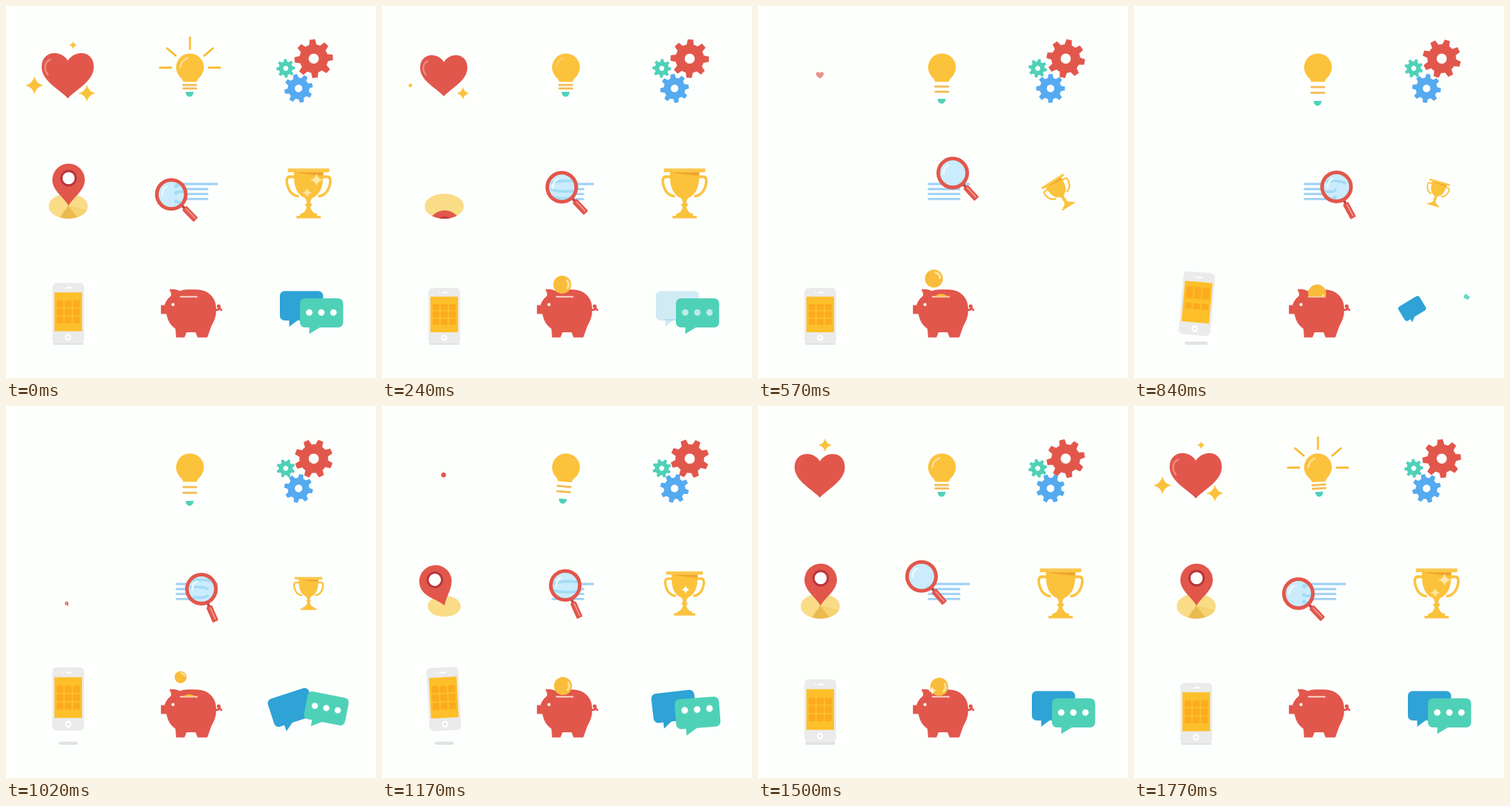
An HTML page with a canvas for the animation above (1800 ms loop, 535 by 537 pixels).

```html
<!DOCTYPE html>
<html lang="en">
<head>
<meta charset="utf-8">
<title>Nine animated icons</title>
<style>
  html, body { margin: 0; width: 100%; height: 100%; overflow: hidden; background: #fdfffd; }
  canvas { display: block; width: 535px; height: 537px; }
</style>
</head>
<body>
<canvas></canvas>
<script>
const W = 535, H = 537, LOOP = 1800, STEP = 30;
const PAPER = '#fdfffd', WHITE = '#fff', RED = '#e2574c', YELLOW = '#fbc23c';
const TEAL = '#4fd1b8', BLUE = '#56aaf0', SKY = '#2fa2d6', CREAM = '#fff3cf';
const canvas = document.querySelector('canvas');
const dpr = window.devicePixelRatio || 1;
canvas.width = W * dpr;
canvas.height = H * dpr;
const ctx = canvas.getContext('2d');
let t = 0;

// Timing helpers: all read the current time t and take start and end times.
const part = (a, b) => Math.min(1, Math.max(0, (t - a) / (b - a)));
const ease = (a, b) => { const u = part(a, b); return u * u * (3 - 2 * u); };
const arch = (a, b) => Math.sin(Math.PI * part(a, b));
// Visible across the loop's seam: grows during a..b, shrinks during c..d.
const span = (a, b, c, d) => 1 - ease(c, d) + ease(a, b);
// Damped swing from 1 to 0 with n half turns; 0 outside its time.
const settle = (a, b, n) => {
  const u = (t - a) / (b - a);
  return u < 0 || u > 1 ? 0 : (1 - u) ** 3 * Math.cos(n * Math.PI * u);
};

// Closed Catmull-Rom curve through evenly timed points.
function orbit(points) {
  const n = points.length, pos = t / LOOP * n, i = Math.floor(pos), u = pos - i;
  const [p, q, r, s] = [-1, 0, 1, 2].map(k => points[(i + k + n) % n]);
  return q.map((v, c) => v + .5 * u * (r[c] - p[c]
    + u * (2 * p[c] - 5 * v + 4 * r[c] - s[c] + u * (3 * (v - r[c]) + s[c] - p[c]))));
}

function fill(path, color) {
  ctx.fillStyle = color;
  ctx.fill(new Path2D(path));
}

function line(path, color, width, cap = 'round') {
  ctx.strokeStyle = color;
  ctx.lineWidth = width;
  ctx.lineCap = cap;
  ctx.stroke(new Path2D(path));
}

function oval(x, y, rx, color, ry = rx) {
  ctx.beginPath();
  ctx.ellipse(x, y, rx, ry, 0, 0, 7);
  ctx.fillStyle = color;
  ctx.fill();
}

function arc(x, y, r, from, to, color, width) {
  ctx.beginPath();
  ctx.arc(x, y, r, from * Math.PI / 180, to * Math.PI / 180);
  ctx.strokeStyle = color;
  ctx.lineWidth = width;
  ctx.lineCap = 'round';
  ctx.stroke();
}

function box(x, y, w, h, r, color) {
  ctx.beginPath();
  ctx.roundRect(x, y, w, h, r);
  ctx.fillStyle = color;
  ctx.fill();
}

// Draw in stage coordinates, transformed around a pivot.
function about(px, py, { dx = 0, dy = 0, rot = 0, s = 1, sx = s, sy = s, alpha = 1 }, draw) {
  if (!sx || !sy || alpha <= 0) return;
  ctx.save();
  ctx.globalAlpha *= alpha;
  ctx.translate(px + dx, py + dy);
  ctx.rotate(rot * Math.PI / 180);
  ctx.scale(sx, sy);
  ctx.translate(-px, -py);
  draw();
  ctx.restore();
}

function clipped(path, draw) {
  ctx.save();
  ctx.clip(new Path2D(path));
  draw();
  ctx.restore();
}

function sparkle(x, y, r, color, alpha = 1) {
  about(0, 0, { dx: x, dy: y, s: r, alpha }, () =>
    fill('M0-1Q.18-.18 1 0Q.18.18 0 1Q-.18.18-1 0Q-.18-.18 0-1Z', color));
}

function heart() {
  oval(89, 99.5, 10 * (ease(1110, 1260) - ease(1260, 1380)), RED);
  const grown = t < 1200 ? 1 - ease(130, 710) : 1 - settle(1200, 1650, 3);
  about(89.5, 100, { s: grown, alpha: 1 - .35 * arch(240, 900) }, () => {
    fill('M89.5 133.5C80 122 51.5 109 51.5 88C51.5 75 60 68 70 68C79 68 86 73 89.5 79C93 73 100 68 109 68C119 68 127 75 127 88C127 109 99 122 89.5 133.5Z', RED);
    about(0, 0, { alpha: .32 * span(1440, 1680, 300, 500) }, () =>
      line('M60.5 99C54 91 56 80 64 77.5', WHITE, 2.6));
  });
  sparkle(97, 56.5, 5.8 * span(1380, 1500, 0, 210) + 4 * arch(1380, 1650), YELLOW);
  sparkle(41, 114.5, 13 * span(1540, 1700, 90, 330), YELLOW);
  sparkle(117, 126, 12.2 * span(1560, 1740, 150, 420), YELLOW);
}

function bulb() {
  const rot = 5 * (arch(1100, 1260) - arch(1680, 1800));
  const gap = ease(240, 720) * (1 - ease(1080, 1380));
  about(266, 89, { rot }, () => {
    fill('M256 109.5C256 104 246 101 246 88.5A20 20 0 0 1 286 88.5C286 101 276 104 276 109.5Z', YELLOW);
    about(0, 0, { alpha: .5 * span(1080, 1440, 0, 450) }, () => {
      const turn = t > 900 ? 80 * (1 - ease(1110, 1400)) : 0;
      arc(266, 89, 14, 185 + turn, 255 + turn, WHITE, 2.4);
    });
    line(`M256.5 ${113.9 + 3 * gap}h18.5`, '#f4bc55', 3);
    line(`M256.5 ${119 + 6.3 * gap}h18.5`, '#f4bc55', 3);
    fill(`M259.8 ${124 + 13 * gap}h11.4q-.5 7-5.7 7t-5.7-7z`, TEAL);
  });

  const inner = t < 900 ? 27 + 16.5 * ease(90, 210) : 27;
  const outer = t < 900 ? 43.5 : 27 + 16.5 * ease(1620, 1710);
  if (outer - inner < .3) return;
  for (let i = 0; i < 5; i++) {
    about(266, 89, { rot: 180 + i * 45 - 5 * Math.sin(i * Math.PI / 2) }, () =>
      line(`M${266 + inner} 89H${266 + outer}`, '#fbb92b', 2.8));
  }
}

function gear(x, y, r, phase, color) {
  about(0, 0, { dx: x, dy: y, rot: phase + 45 * t / LOOP, s: r }, () => {
    oval(0, 0, .75, color);
    for (let i = 0; i < 8; i++) {
      about(0, 0, { rot: i * 45 }, () => fill('M-.2-.65L-.14-1H.14L.2-.65Z', color));
    }
    oval(0, 0, .265, PAPER);
  });
}

function gears() {
  gear(445, 76, 27.7, -4, RED);
  gear(423, 119, 20.7, -14, BLUE);
  gear(404.5, 90, 13.4, -3, TEAL);
}

function pin() {
  about(90, 289, { s: span(990, 1230, 330, 480) }, () => {
    oval(90, 289, 28.3, '#fadc87', 18);
    clipped('M61.7 289a28.3 18 0 0 1 56.6 0a28.3 18 0 0 1-56.6 0', () =>
      about(0, 0, { alpha: span(1290, 1400, 60, 180) }, () => {
        fill('M90 288L76 308H106Z', '#eabb4f');
        fill('M90 288L106 308L125 296Z', '#f6d271');
      }));
  });
  const leaving = t < 400;
  const pose = leaving
    ? { dy: 86 * ease(30, 330) }
    : { s: ease(990, 1140), rot: -75 * settle(990, 1590, 6) };
  const draw = () => about(90, 288, pose, () => {
    fill('M90.5 288.5C85 277 67 267 67 251A23.5 23.5 0 0 1 114 251C114 267 96 277 90.5 288.5Z', RED);
    oval(90.5, 248.5, 12, '#b9353a');
    oval(90.5, 248.5, 8.8, WHITE);
  });
  // A sinking pin is hidden below the front edge of the disc.
  if (leaving) clipped('M0 150H180V289H118.3A28.3 18 0 0 1 61.7 289H0Z', draw);
  else draw();
}

function search() {
  const rows = [0, 1, 2, 3].map(i => [257 + 7.2 * i, i ? 291 : 305]);
  for (const [y, end] of rows) line(`M247 ${y}H${end}`, '#a3d3f5', 3.4);
  const [x, y, rot] = orbit([
    [239, 272, 46], [265, 258, 47], [283, 241, 48],
    [292, 264.5, 64], [262, 258, 65], [236.5, 246, 49]
  ]);
  about(0, 0, { dx: x, dy: y, rot }, () => {
    line('M22 0H30', '#b9434a', 4, 'butt');
    box(27, -4.5, 24, 9, 1.5, RED);
    line('M30-1H48', '#f3a39c', 1.6);
  });
  oval(x, y, 23.6, RED);
  oval(x, y, 18.3, '#caecfc');
  // The glass magnifies and bends the lines below it.
  clipped(`M${x - 18.3} ${y}a18.3 18.3 0 0 1 36.6 0a18.3 18.3 0 0 1-36.6 0`, () => {
    for (const [rowY, end] of rows) {
      const bent = y + (rowY - y) * 1.4;
      line(`M246 ${bent}Q${x} ${bent + (bent > y ? 5 : -6)} ${end} ${bent}`, '#a3dcf4', 4);
    }
  });
  arc(x, y, 13, 175, 240, '#eefaff', 2.6);
}

function cup() {
  const s = 1 - .49 * ease(240, 720) * (1 - ease(840, 1320));
  const rot = 16 * arch(705, 1005) - 33 * arch(405, 705);
  about(437.5, 271, { s, rot }, () => {
    const handle = () => line('M418 246.5H410.5C405.5 246.5 405.5 252 406.5 257C408.5 266 413 273 422 274.5', YELLOW, 3.8);
    handle();
    about(437.5, 0, { sx: -1 }, handle);
    fill('M416.5 239H458.5C460 262 453 273 443 277Q440 280 440 285H442V289H440Q441 297 448 300H450V303H455V306.5H420V303H425V300H427Q434 297 435 289H433V285H435Q435 280 432 277C422 273 415 262 416.5 239Z', YELLOW);
    fill('M417 240H459L458.5 245Q438 244 417 240Z', '#f0a52e');
    box(407.5, 234.5, 60, 5.6, .5, '#fbc74b');
  });
  sparkle(449, 251, 9 * span(1590, 1710, 0, 200), CREAM, .75);
  sparkle(435.5, 269.5, 7 * span(1650, 1770, 0, 200), CREAM, .65);
  sparkle(439, 265, 6 * arch(1080, 1260), WHITE);
}

function phone() {
  const rise = ease(570, 1020) * (1 - ease(1200, 1560));
  const w = 44 * (1 - .38 * rise);
  box(90 - w / 2, 484.5, w, 4.5, 2, '#e0e2e3');
  const rot = 5 * arch(660, 1020) - 3 * arch(1020, 1320);
  const sy = 1 + .09 * (1 - ease(0, 210)) + .14 * ease(600, 840) - .05 * ease(1500, 1800);
  const morph = arch(690, 990);
  about(90, 487, { dx: -.6 * rot, dy: -18.5 * rise, sy, rot }, () => {
    box(67, 407, 46, 80, 6, '#ebebec');
    line('M87.5 413.5h7', WHITE, 2);
    oval(83, 413.5, 1, WHITE);
    box(70, 419.5, 40, 51.5, 0, '#fdc02a');
    for (let i = 0; i < 9; i++) {
      const row = Math.floor(i / 3);
      const h = 9 + morph * (6 - 7.5 * row);
      box(73 + i % 3 * 12, 430 + 10.7 * row + morph * (10 * row - 4), 10, h, Math.min(1.5, h / 2), '#fcab1f');
    }
    oval(90, 479, 4.4, WHITE);
    box(88.6, 477.6, 2.8, 2.8, .8, '#dcdcde');
  });
}

function coin(start, end) {
  if (t < start || t > end) return;
  const y = 388 + 46 * part(start, end);
  const x = 265 - 12 * Math.max(0, (418 - y) / 26) ** 2;
  about(x, y, { s: part(start, start + 60) }, () => {
    oval(x, y, 13, '#f9bd3b');
    const angle = 200 * part(start, end) - 100;
    arc(x, y, 9, angle, angle + 70, '#fde3a0', 3);
  });
}

function piggy() {
  fill('M224 432H229C231 426 234 422 238 419C240 417 238 412 236 409.5C241 408 247 409 251 411.5C257 409 264 409.3 274 409.3C293 409.3 304 421 304 438C304 450 300 456 297 462L291 478.5H277L274 471H261L258 478.5H246L245 466C238 461 234 455 232 444.5H224Z', RED);
  line('M303 438C306 440 310 437 309 433.5C308 431 305.5 432 306.5 434.5C307 437 310 437 311.5 439', RED, 2.8);
  oval(241.5, 431, 2.2, WHITE);
  line('M251.5 419.7H277', '#f9dcd4', 2, 'butt');
  clipped('M220 360H320V419.5H220Z', () => {
    coin(60, 640);
    coin(500, 1080);
    coin(980, 1520);
    coin(1335, 1775);
  });
  sparkle(252, 411, 6 * arch(1410, 1590), CREAM);
}

function chat() {
  const leaving = t < 600;
  const backWay = 1 - ease(690, 1350), frontWay = 1 - ease(780, 1140);
  const back = leaving
    ? { alpha: 1 - ease(30, 330) }
    : { dx: -29 * backWay, dy: 5 * backWay, rot: -36 * backWay, s: ease(660, 990) };
  const front = leaving
    ? { alpha: 1 - ease(240, 510) }
    : { dx: 27 * frontWay, dy: -25 * frontWay, rot: 43 * frontWay - 5 * arch(1110, 1290),
        s: ease(780, 1050) + .03 * arch(1080, 1290) };
  about(427, 432, back, () => {
    box(396, 411.5, 62.5, 42.5, 7, SKY);
    fill('M409.5 452V463L424 452Z', SKY);
  });
  about(456, 443, front, () => {
    box(425, 422, 62.5, 42, 7, TEAL);
    fill('M438.5 462V473.5L457 462Z', TEAL);
    about(0, 0, { dy: -5 * arch(1110, 1290), alpha: leaving ? 1 - ease(120, 400) : 1 }, () => {
      for (let i = 0; i < 3; i++) oval(438.5 + 17.5 * i, 442.5, 4.7, WHITE);
    });
  });
}

const begin = performance.now();
function frame() {
  t = Math.floor(((performance.now() - begin) % LOOP) / STEP) * STEP;
  ctx.setTransform(dpr, 0, 0, dpr, 0, 0);
  ctx.fillStyle = PAPER;
  ctx.fillRect(0, 0, W, H);
  for (const draw of [heart, bulb, gears, pin, search, cup, phone, piggy, chat]) draw();
  requestAnimationFrame(frame);
}
frame();
</script>
</body>
</html>
```
